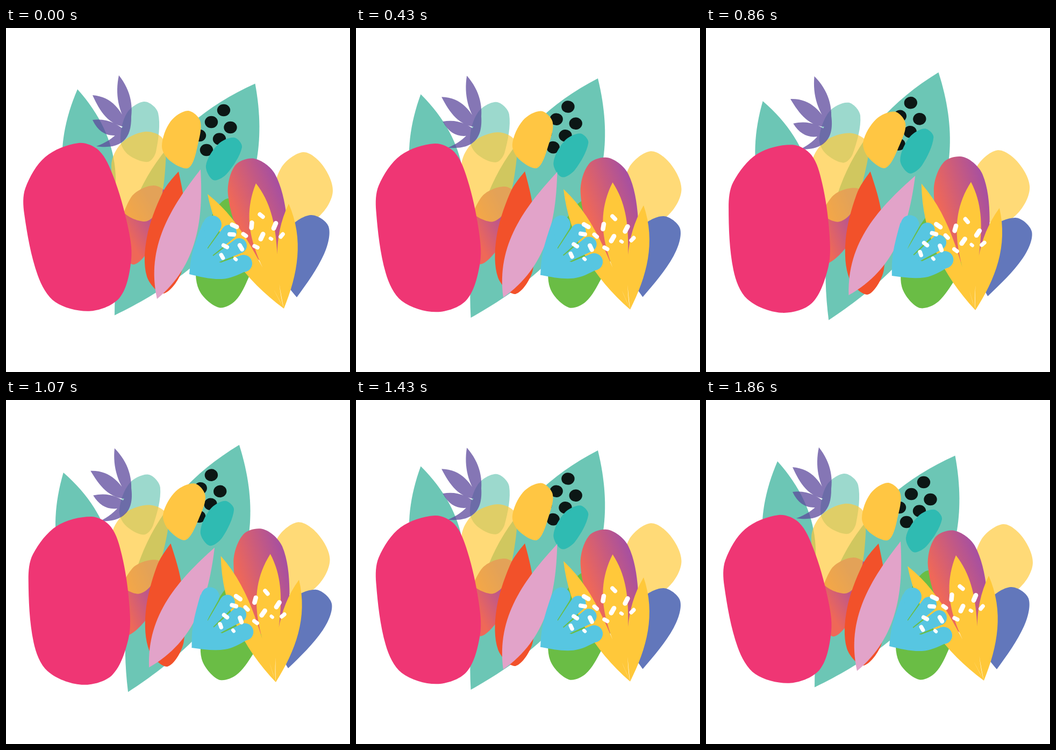
Write an HTML page with a canvas that moves like this. It is 640 by 640 pixels and loops after 1930 ms.

```html
<!DOCTYPE html>
<html lang="en">
<head>
<meta charset="utf-8">
<title>Swaying fruit and flowers</title>
<style>
  html, body { margin: 0; width: 100%; height: 100%; overflow: hidden; background: #fff; }
  canvas { display: block; width: 100vw; height: 100vh; }
</style>
</head>
<body>
<canvas id="stage" width="640" height="640"></canvas>
<script>
const ctx = document.getElementById('stage').getContext('2d');
const LOOP = 1930, STEPS = 27, HALF = 13;

const read = text => text.trim().split(/\s*,\s*/).map(p => p.split(/\s+/).map(Number));
const dist = (a, b) => Math.hypot(b[0] - a[0], b[1] - a[1]);
const mid = (a, b) => [(a[0] + b[0]) / 2, (a[1] + b[1]) / 2];

// Smooth curve through points, from the path's current point.
function curve(path, pts, closed) {
  const n = pts.length;
  const at = i => closed ? pts[(i + n) % n] : pts[i];
  const handle = (i, next) => {
    const a = at(i - 1), p = at(i), b = at(i + 1);
    if (!a || !b) return null;
    const k = dist(p, at(next)) / (dist(a, p) + dist(p, b)) / 3 * (next - i);
    return [p[0] + (b[0] - a[0]) * k, p[1] + (b[1] - a[1]) * k];
  };
  for (let i = 0; i < (closed ? n : n - 1); i++) {
    const p = at(i), q = at(i + 1);
    const d = handle(i + 1, i);
    const c = handle(i, i + 1) || mid(p, d || q);
    path.bezierCurveTo(...c, ...(d || mid(q, c)), ...q);
  }
}

// Round outline through a few points.
function blob(text) {
  const path = new Path2D(), pts = read(text);
  path.moveTo(...pts[0]);
  curve(path, pts, true);
  return path;
}

// Outline with a sharp corner wherever "|" stands.
function cut(text) {
  const path = new Path2D();
  let end = null;
  for (const run of text.split('|').map(read)) {
    if (end) curve(path, [end, ...run], false);
    else path.moveTo(...run[0]);
    end = run[run.length - 1];
  }
  path.closePath();
  return path;
}

// Pointed leaves: two tips, then how far each side bulges near either tip.
function leaves(text) {
  const path = new Path2D();
  for (const [x0, y0, x1, y1, a0, a1, b0, b1] of read(text)) {
    const dx = x1 - x0, dy = y1 - y0, len = Math.hypot(dx, dy);
    const off = (k, w) => [x0 + dx * k + dy / len * w, y0 + dy * k - dx / len * w];
    path.moveTo(x0, y0);
    path.bezierCurveTo(...off(1 / 3, a0), ...off(2 / 3, a1), x1, y1);
    path.bezierCurveTo(...off(2 / 3, -b1), ...off(1 / 3, -b0), x0, y0);
  }
  return path;
}

// Round-ended petals that taper to one shared base.
function fan(x, y, text) {
  const path = new Path2D();
  for (const [cx, cy, r] of read(text)) {
    const dir = Math.atan2(cy - y, cx - x);
    const open = Math.PI / 2 + Math.asin(r / Math.hypot(cx - x, cy - y));
    path.moveTo(x, y);
    path.arc(cx, cy, r, dir - open, dir + open);
    path.closePath();
  }
  return path;
}

function dots(text) {
  const path = new Path2D();
  for (const [x, y] of read(text)) {
    path.moveTo(x + 12, y);
    path.ellipse(x, y, 12.2, 11.3, 0, 0, Math.PI * 2);
  }
  return path;
}

// Flecks: place, tilt in degrees, length.
function flecks(text) {
  const path = new Path2D();
  for (const [x, y, tilt, len] of read(text)) {
    const a = tilt * Math.PI / 180, r = 2 + len / 8, h = len / 2 - r;
    const dx = Math.cos(a) * h, dy = Math.sin(a) * h;
    path.moveTo(x + dx + Math.sin(a) * r, y + dy - Math.cos(a) * r);
    path.arc(x + dx, y + dy, r, a - Math.PI / 2, a + Math.PI / 2);
    path.arc(x - dx, y - dy, r, a + Math.PI / 2, a + Math.PI * 1.5);
    path.closePath();
  }
  return path;
}

function blend(x0, y0, x1, y1) {
  const g = ctx.createLinearGradient(x0, y0, x1, y1);
  g.addColorStop(0, '#ef6858');
  g.addColorStop(1, '#a8509f');
  return g;
}

const teal = '#6cc6b5', gold = '#ffc83a', blue = '#57c6e1', haze = 'rgba(255,201,55,.68)';
const parts = [];
// Pivot, full turn in degrees, then pairs of colour and path.
const add = (px, py, turn, ...layers) => parts.push({ px, py, turn, layers });

// Back leaves and seeds
add(290, 338, -7.45, teal, leaves('133 114 170 420 72 66 60 62'));
add(285, 334.5, -7.45,
  teal, leaves('463.5 103.5 202 534.5 150 108 116 102'),
  '#0c1715', dots('405 153, 382 175, 417.5 185, 360 200, 397 206.5, 373 227'),
  '#2fbbb2', blob('425 204, 439 222, 411 271, 386 283, 372 256, 395 216'));

// Left cluster
add(248, 190, 8, 'rgba(108,198,181,.67)',
  blob('258 137, 283 158, 279 230, 264 249, 228 236, 213 210, 225 158'));
add(243, 329, 8, blend(228, 390, 290, 355),
  blob('275 293, 303 315, 280 390, 238 440, 210 400, 232 316'));
add(247, 262, 9, haze,
  blob('258 193, 291 205, 297 250, 283 338, 258 360, 215 338, 196 256, 215 214'));
add(336, 229, 10.8, '#ffc643',
  blob('338 154, 361 172, 358 212, 340 260, 305 247, 290 220, 306 174'));
add(314, 415, -6, '#f2512a',
  cut('321 267 | 334 350, 327 452, 293 494, 262 462, 262 390, 291 307, 321 267'));
add(310.5, 416.5, 10.7, '#e2a3c9', leaves('362 263 281 504 34 52 30 51'));
add(222, 163, -6.6, 'rgba(92,72,157,.75)', leaves(`210 88 229 185 17 17 14 14,
  161 125 228 185 23 14 13 23, 161 171 225 195 12 11 22 20, 232 150 168 220 36 46 -17 -17`));
add(125, 398, 8.1, '#ef3674', blob(`135 214, 73 240, 36 298, 34 346, 59 460, 92 510,
  158 526.5, 212 501, 233 430, 226 366, 200 277, 173 228`));

// Right cluster
add(502, 372, -4.6, haze, blob('553 231, 588 254, 608 303, 586 347, 540 370, 500 320, 512 260'));
add(544, 409, 10.7, '#6277bb',
  cut('541 501 | 592 420, 600 369, 567 348, 525 375, 505 440, 541 501'));
add(396, 515, 9.8, '#6abd45',
  blob('396 520, 359 487, 355 430, 385 345, 415 317, 455 350, 470 410, 452 463, 427 507'));
add(495, 402, 6.5, blend(420, 325, 505, 290),
  blob('462 243, 500 271, 522 350, 518 415, 490 443, 440 395, 413 310, 426 256'));
add(493, 438.5, 10.75, gold, leaves(`375 309 517 522 28 7 35 31,
  465 289 517 522 38 -4 55 20, 526 327 517 522 32 23 28 17`));
add(374, 411, -5.8,
  blue, fan(341, 458, '384 366 17, 415 380 14, 434 405 14, 442 438 16'),
  blue, cut('341 458 | 347 417, 367 360 | 375 410 | 393 434 | 445 453 | 402 467, 341 458'));
add(430, 407, 10.7, '#fff', flecks(`425 368 25 18, 420 384 5 16, 444 385 35 14, 408 406 28 15,
  437 408 60 17, 402 425 60 14, 427 430 40 9, 457 367 95 18, 475 349 40 15, 500 368 113 19,
  476 388 115 19, 493 392 30 9, 513 386 130 14, 465 407 25 14`));

function render(sway) {
  ctx.fillStyle = '#fff';
  ctx.fillRect(0, 0, 640, 640);
  for (const { px, py, turn, layers } of parts) {
    ctx.save();
    ctx.translate(px, py);
    ctx.rotate(turn * sway * Math.PI / 180);
    ctx.translate(-px, -py);
    for (let i = 0; i < layers.length; i += 2) {
      ctx.fillStyle = layers[i];
      ctx.fill(layers[i + 1]);
    }
    ctx.restore();
  }
}

function tick() {
  const t = performance.now() % LOOP;
  // Steps begin on whole hundredths of a second.
  const step = Math.floor((Math.floor(t / 10) + 0.5) * 10 * STEPS / LOOP);
  render((1 - Math.cos(Math.PI * step / HALF)) / 2);
  requestAnimationFrame(tick);
}
tick();
</script>
</body>
</html>
```
